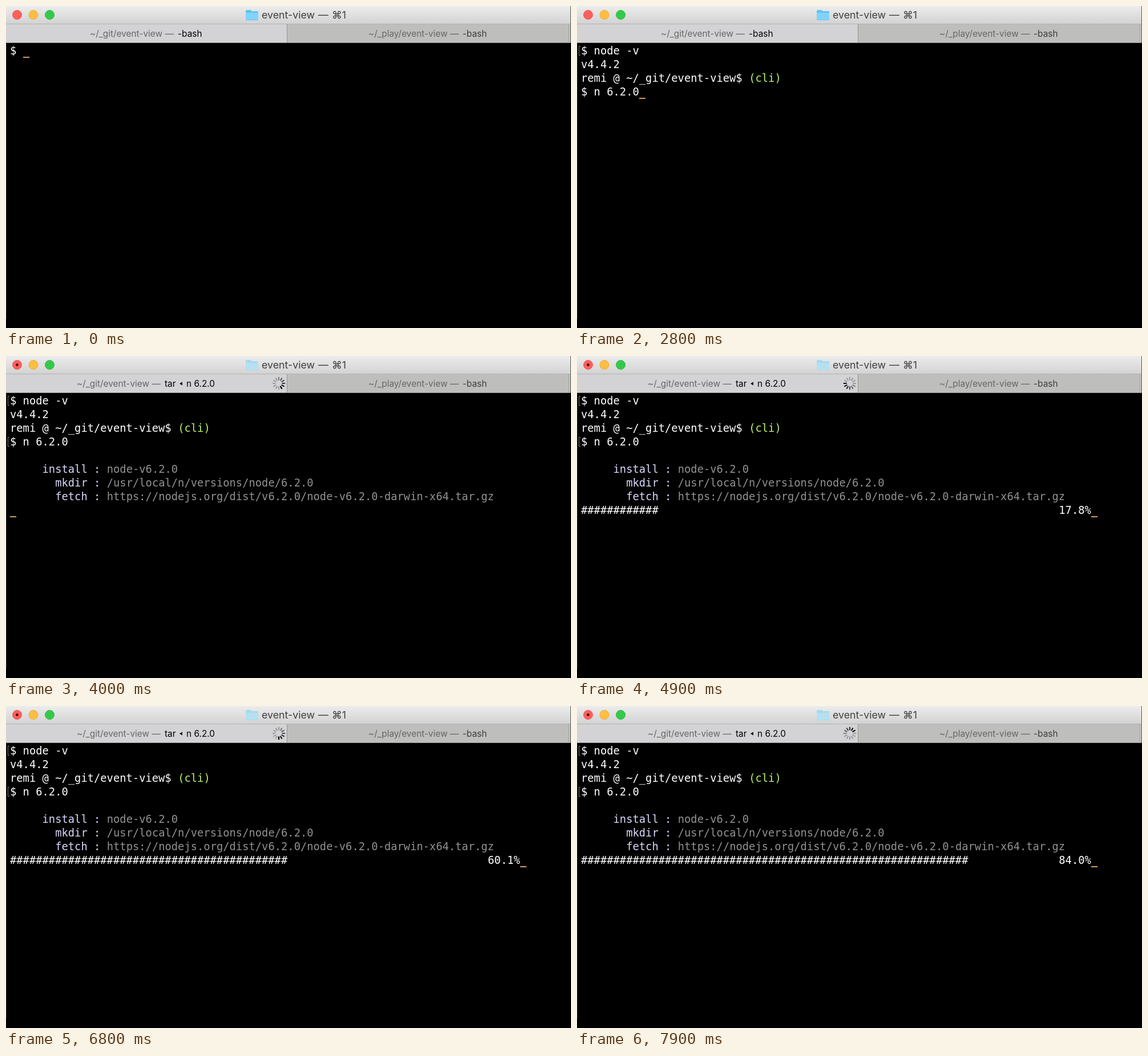
An HTML page with a canvas that plays this animation: 990 px wide and 565 px high, repeating every 8000 ms.

```html
<!DOCTYPE html>
<html lang="en">
<head>
<meta charset="utf-8">
<title>Terminal</title>
<style>
  html, body { margin: 0; width: 100%; height: 100%; overflow: hidden; background: #000; }
  canvas { display: block; }
</style>
</head>
<body>
<canvas id="stage" width="990" height="565"></canvas>
<script>
const ctx = document.getElementById('stage').getContext('2d');
const LOOP = 8000, STEP = 100;
const CELL = 11.315, LEFT = 7, ROW = 24;
const MONO = '18.8px "DejaVu Sans Mono", monospace';
const TAB = '15.4px Inter, "DejaVu Sans", sans-serif';
const TITLE = '17.8px Inter, "DejaVu Sans", sans-serif';
const WHITE = '#fff', GREEN = '#b9f26b', LABEL = '#d9d8fc', GREY = '#919191';

// Download progress: [ms, percent]
const PROGRESS = [[4100, 0], [4900, 17.8], [5000, 19.9], [5900, 41.1], [6800, 60.1], [7900, 84]];

function rect(x, y, w, h, color) {
  ctx.fillStyle = color;
  ctx.fillRect(x, y, w, h);
}

function text(str, x, y, color, font) {
  ctx.font = font;
  ctx.fillStyle = color;
  ctx.fillText(str, x, y);
}

function disc(x, y, r, fill, stroke) {
  ctx.beginPath();
  ctx.arc(x, y, r, 0, Math.PI * 2);
  ctx.fillStyle = fill;
  ctx.fill();
  if (!stroke) return;
  ctx.strokeStyle = stroke;
  ctx.lineWidth = 1;
  ctx.stroke();
}

const print = (str, col, row, color = WHITE) =>
  text(str, LEFT + col * CELL, 85 + row * ROW, color, MONO);

const cursor = (col, row) =>
  rect(Math.round(LEFT + col * CELL), 89 + row * ROW, 11, 2, '#cf9d5f');

// Prompt mark in the left margin
function mark(row) {
  const y = 70 + row * ROW;
  rect(3, y, 1, 17, '#777');
  rect(3, y, 3, 1, '#777');
  rect(3, y + 16, 3, 1, '#777');
}

function folder(busy) {
  ctx.fillStyle = busy ? '#a5d9ee' : '#62c4f5';
  ctx.beginPath();
  ctx.roundRect(420, 7, 10, 6, 1.5);
  ctx.roundRect(420, 9, 22, 16, 1.5);
  ctx.fill();
  rect(420, 12, 22, 12, busy ? '#b5e0f0' : '#82d3fb');
}

function spinner(t) {
  const head = Math.floor(2.7 + (t - 5900) * 0.0177 + 1e-6);
  ctx.lineWidth = 2.2;
  ctx.lineCap = 'round';
  for (let i = 0; i < 12; i++) {
    const behind = (((head - i) % 12) + 12) % 12;
    const a = i * Math.PI / 6, sx = Math.sin(a), sy = -Math.cos(a);
    ctx.strokeStyle = `rgba(0,0,0,${Math.max(0.25, 1 - behind * 0.12)})`;
    ctx.beginPath();
    ctx.moveTo(478 + sx * 6.3, 48 + sy * 6.3);
    ctx.lineTo(478 + sx * 10.3, 48 + sy * 10.3);
    ctx.stroke();
  }
}

function chrome(t, busy) {
  const bar = ctx.createLinearGradient(0, 0, 0, 31);
  bar.addColorStop(0, '#ececec');
  bar.addColorStop(1, '#d3d3d3');
  rect(0, 0, 990, 31, bar);
  rect(0, 31, 990, 1, '#b4b4b4');
  rect(0, 32, 492, 32, '#d3d3d5');
  rect(492, 32, 1, 32, '#959595');
  rect(493, 32, 494, 32, '#bebebd');
  rect(986, 32, 1, 32, '#a0a0a0');
  rect(987, 32, 3, 32, '#c4c4c4');
  rect(0, 64, 990, 1, '#8f8f8f');
  rect(989, 0, 1, 65, '#555');
  rect(0, 65, 1, 484, '#333');

  disc(19.5, 15.5, 8, '#fc605c', '#ee5a56');
  disc(48, 15.5, 8, '#fdbe41', '#ecae3b');
  disc(76.5, 15.5, 8, '#35c94b', '#30ba42');
  if (busy) disc(19.5, 15.5, 2.4, '#5c0806');

  folder(busy);
  text('event-view', 448, 22, '#404040', TITLE);
  text('—', 547, 22, '#404040', TITLE);
  text('⌘1', 571, 22, '#404040', TITLE);

  text('~/_play/event-view —', 635, 54, '#666', TAB);
  text('-bash', 800, 54, '#3c3c3c', TAB);
  text('~/_git/event-view —', busy ? 124 : 147, 54, '#666', TAB);
  if (!busy) {
    text('-bash', 301, 54, '#000', TAB);
    return;
  }
  text('tar', 278, 54, '#000', TAB);
  ctx.beginPath();
  ctx.moveTo(304, 48.5);
  ctx.lineTo(309, 45.5);
  ctx.lineTo(309, 51.5);
  ctx.fill();
  text('n 6.2.0', 316, 54, '#000', TAB);
  spinner(t);
}

function percentAt(t) {
  const next = Math.max(1, PROGRESS.findIndex(p => p[0] >= t));
  const [t0, p0] = PROGRESS[next - 1], [t1, p1] = PROGRESS[next];
  return p0 + (p1 - p0) * (t - t0) / (t1 - t0);
}

function download(t) {
  const lines = [
    ['install', 'node-v6.2.0'],
    ['mkdir', '/usr/local/n/versions/node/6.2.0'],
    ['fetch', 'https://nodejs.org/dist/v6.2.0/node-v6.2.0-darwin-x64.tar.gz']
  ];
  lines.forEach(([label, value], i) => {
    print(label.padStart(12) + ' :', 0, 5 + i, LABEL);
    print(value, 15, 5 + i, GREY);
  });
  if (t < 4100) return cursor(0, 8);
  const percent = percentAt(t);
  print('#'.repeat(Math.floor(percent * 0.72)), 0, 8);
  print((percent.toFixed(1) + '%').padStart(6), 73, 8);
  cursor(79, 8);
}

function shell(t) {
  const first = 'node -v'.slice(0, t < 400 ? t / 100 : t / 100 + 1);
  print('$ ' + first, 0, 0);
  if (t < 700) return cursor(2 + first.length, 0);

  mark(0);
  print('v4.4.2', 0, 1);
  print('remi @ ~/_git/event-view$', 0, 2);
  print('(cli)', 26, 2, GREEN);

  const typed = t < 1800 ? 0 : t < 1900 ? 1 : t < 2400 ? 2 : 3 + (t - 2400) / 100;
  const second = 'n 6.2.0'.slice(0, typed);
  print('$ ' + second, 0, 3);
  if (t >= 3300) {
    mark(3);
    download(t);
  } else if (t < 1200 || t >= 1500) {
    cursor(2 + second.length, 3);
  }
}

function draw(now) {
  const t = Math.floor(now % LOOP / STEP) * STEP;
  rect(0, 0, 990, 565, '#000');
  chrome(t, t >= 3300);
  shell(t);
  requestAnimationFrame(draw);
}
requestAnimationFrame(draw);
</script>
</body>
</html>
```
